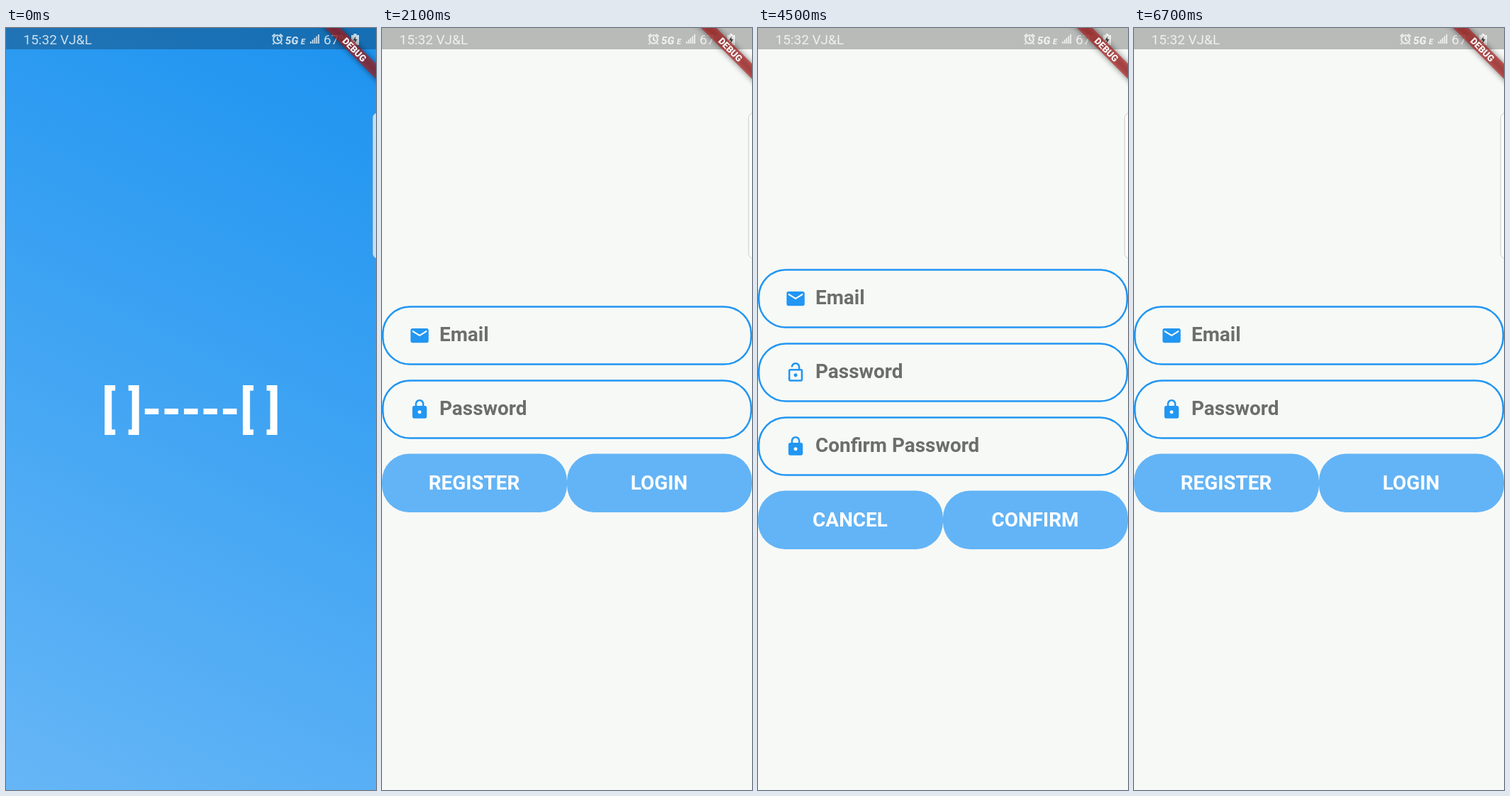
An HTML page that plays this animation: 522x1073 px, repeating every 7600 ms.

```html
<!DOCTYPE html>
<html lang="en">
<head>
<meta charset="utf-8">
<title>Login flow</title>
<style>
  html, body { margin: 0; width: 100%; height: 100%; overflow: hidden; background: #f7f9f6; }
  svg { display: block; width: 522px; height: 1073px; font-family: Roboto, sans-serif; }
  .bold { font-weight: 700; font-size: 27.9px; }
</style>
</head>
<body>
<svg viewBox="0 0 522 1073">
  <defs>
    <linearGradient id="sky" gradientUnits="userSpaceOnUse" x1="522" y1="0" x2="0" y2="1073">
      <stop stop-color="#1c93f0"/><stop offset="1" stop-color="#66b6f6"/>
    </linearGradient>
    <filter id="blur" x="-50%" y="-150%" width="200%" height="400%"><feGaussianBlur stdDeviation="3.5"/></filter>
  </defs>
  <rect width="522" height="1073" fill="#f7f9f6"/>
  <g id="signup"></g>
  <g id="login"></g>
  <g id="splash">
    <rect width="522" height="1073" fill="url(#sky)"/>
    <text x="261" y="561" text-anchor="middle" font-size="71" font-weight="700" fill="#fff">[ ]-----[ ]</text>
  </g>

  <rect x="517.3" y="119.5" width="20" height="205" rx="7" fill="#fff" fill-opacity=".7" stroke="#888" stroke-opacity=".4"/>

  <rect width="522" height="30" opacity=".25"/>
  <g fill="#fff" opacity=".77" font-size="19">
    <text x="24.5" y="23">15:32</text>
    <text x="76.5" y="23">VJ&amp;L</text>
    <g fill="none" stroke="#fff" stroke-width="2">
      <circle cx="383" cy="16" r="5.8"/>
      <path d="M375.5 12l4-3.500M390.500 12l-4-3.500M383 12.500v4l3 1.500M378 21l-1.500 2M388 21l1.500 2"/>
    </g>
    <text x="394" y="22.500" font-size="15" font-weight="900" font-style="italic">5G</text>
    <text x="416" y="22.500" font-size="11" font-weight="900" font-style="italic">E</text>
    <path d="M429 22v-3h1.800v3zM431.800 22v-5.500h1.800v5.500zM434.600 22v-8h1.800v8zM437.400 22v-10.500h1.800v10.500zM440.200 22v-13h1.800v13z"/>
    <text x="448" y="23">67%</text>
    <path d="M490.500 8h4v2h3.500v14h-11V10h3.500z"/>
  </g>
  <path d="M493.500 11.500l-4 6h2.800l-1 4.500 4.500-6.200h-3z" fill="#222" opacity=".85"/>

  <g transform="translate(522) rotate(45) scale(1.269)">
    <rect x="-50" y="28" width="100" height="12" opacity=".5" filter="url(#blur)"/>
    <rect x="-50" y="28" width="100" height="12" fill="#b71c1c" fill-opacity=".627"/>
    <text y="37.600" text-anchor="middle" font-size="10.200" font-weight="900" fill="#fff">DEBUG</text>
  </g>
</svg>
<script>
const LOOP = 7600, STEP = 100;
const byId = id => document.getElementById(id);
const login = byId('login'), signup = byId('signup'), splash = byId('splash');

const icons = {
  mail: 'M20 4H4c-1.1 0-1.99.9-1.99 2L2 18c0 1.100.9 2 2 2h16c1.100 0 2-.9 2-2V6c0-1.100-.9-2-2-2zm0 4l-8 5-8-5V6l8 5 8-5v2z',
  lock: 'M18 8h-1V6c0-2.760-2.240-5-5-5S7 3.240 7 6v2H6c-1.100 0-2 .9-2 2v10c0 1.100.9 2 2 2h12c1.100 0 2-.9 2-2V10c0-1.100-.9-2-2-2zm-6 9c-1.100 0-2-.9-2-2s.9-2 2-2 2 .9 2 2-.9 2-2 2zm3.100-9H8.900V6c0-1.710 1.390-3.100 3.100-3.100 1.710 0 3.100 1.390 3.100 3.100v2z',
  open: 'M12 17c1.100 0 2-.9 2-2s-.9-2-2-2-2 .9-2 2 .9 2 2 2zm6-9h-1V6c0-2.760-2.240-5-5-5S7 3.240 7 6h1.900c0-1.710 1.390-3.100 3.100-3.100 1.710 0 3.100 1.390 3.100 3.100v2H6c-1.100 0-2 .9-2 2v10c0 1.100.9 2 2 2h12c1.100 0 2-.9 2-2V10c0-1.100-.9-2-2-2zm0 12H6V10h12v10z'
};

const field = (y, icon, label) => `<g transform="translate(0 ${y})">
  <rect x="1.2" y="1" width="519.6" height="81" rx="38" fill="none" stroke="#2196f3" stroke-width="2.5"/>
  <path transform="translate(37.8 26.300) scale(1.27)" fill="#2196f3" d="${icons[icon]}"/>
  <text class="bold" x="81" y="49.500" fill="#6c6e6c">${label}</text></g>`;

const button = (x, y, label) => `<g transform="translate(${x} ${y})">
  <rect width="261" height="82.500" rx="38" fill="#63b4f6"/>
  <text class="bold" x="130" y="50.500" text-anchor="middle" fill="#fff">${label}</text></g>`;

login.innerHTML = field(391.5, 'mail', 'Email') + field(495.5, 'lock', 'Password') +
  button(0, 599.5, 'REGISTER') + button(261, 599.5, 'LOGIN');
signup.innerHTML = field(339.5, 'mail', 'Email') + field(443.5, 'open', 'Password') +
  field(547.5, 'lock', 'Confirm Password') + button(0, 651.5, 'CANCEL') + button(261, 651.5, 'CONFIRM');

const progress = (t, start, length) => Math.min(1, Math.max(0, (t - start) / length));

// away: 0 = sign-up form settled, 1 = login form settled
function draw(now) {
  const t = Math.floor(now % LOOP / STEP) * STEP;
  const leaving = t >= 5100;
  const away = leaving ? progress(t, 5160, 455) ** 2 : (1 - progress(t, 3500, 300)) ** 2;
  splash.style.display = t < 2100 ? '' : 'none';
  login.setAttribute('opacity', away);
  signup.setAttribute('transform', `translate(0 ${247 * away ** 3.53})`);
  [...signup.children].forEach((part, i) => {
    let opacity = 1 - away;
    if (leaving && i === 2) opacity = 1 - away ** 3;
    if (leaving && i === 3) opacity **= 1.4;
    part.setAttribute('opacity', opacity);
  });
}

const begin = performance.now();
(function tick() {
  draw(performance.now() - begin);
  requestAnimationFrame(tick);
})();
</script>
</body>
</html>
```
